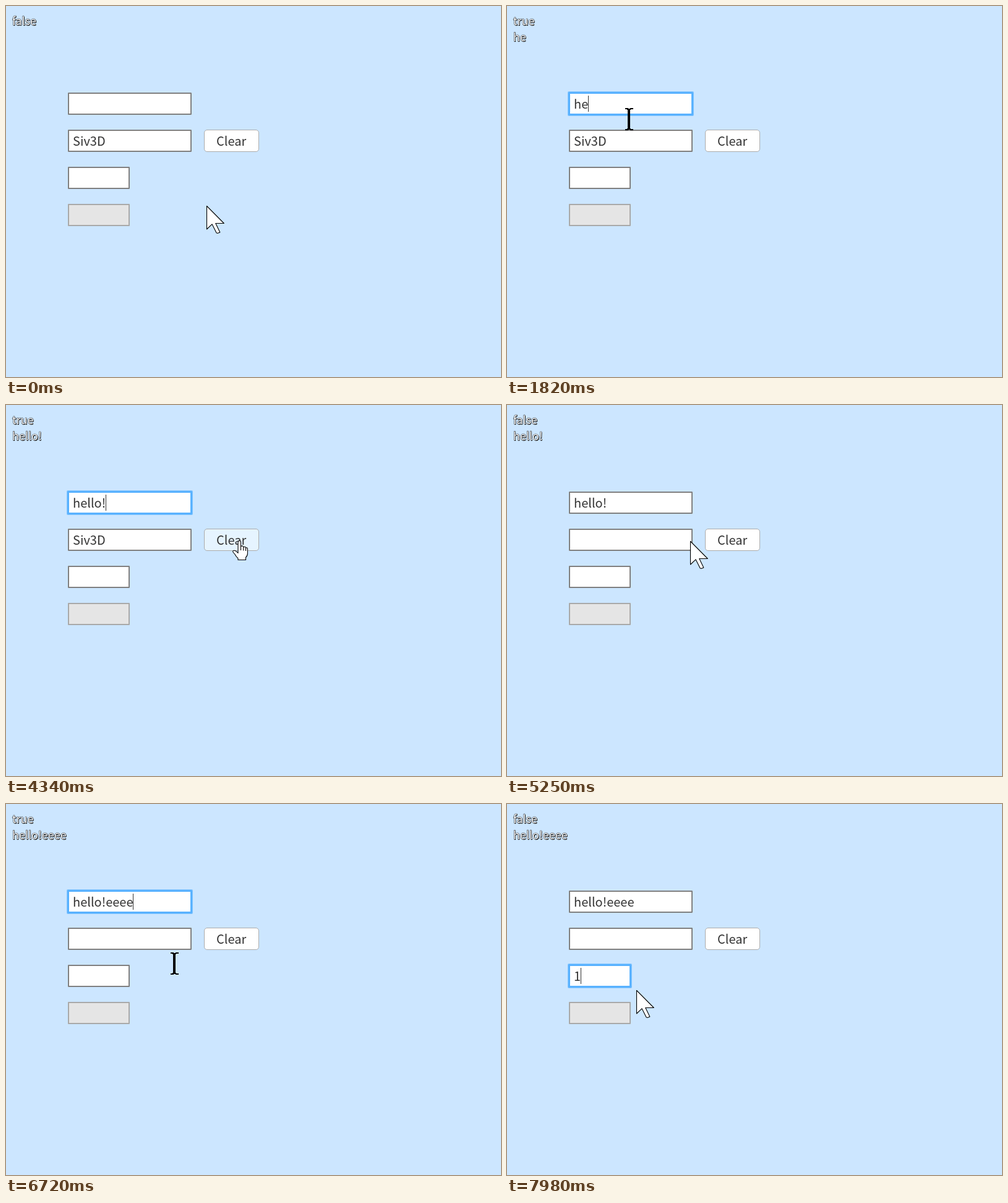
These frames come from a looping animation (800x600 px, 8000 ms). An HTML page with a canvas:

```html
<!DOCTYPE html>
<html lang="en">
<head>
<meta charset="utf-8">
<title>Text boxes</title>
<style>
  html, body { margin: 0; width: 100%; height: 100%; overflow: hidden; background: #cce6ff; }
  canvas { display: block; }
</style>
</head>
<body>
<canvas id="stage" width="800" height="600"></canvas>
<script>
const ctx = document.getElementById('stage').getContext('2d');
const LOOP = 8000, STEP = 70, BLINK = 630;
const INK = '#333';
const FAMILY = '"Noto Sans CJK JP", "Noto Sans CJK", "Noto Sans", sans-serif';

// Pointer path: time, x, y, shape
const pointer = [
  [0, 324, 323, 'arrow'], [140, 292, 296, 'arrow'], [280, 228, 238, 'arrow'],
  [420, 180, 198, 'beam'], [490, 178, 192, 'beam'], [630, 194, 185, 'beam'],
  [840, 194, 185, 'beam'], [910, 197, 183, 'beam'], [3430, 197, 183, 'beam'],
  [3500, 206, 244, 'arrow'], [3570, 240, 306, 'arrow'], [3640, 276, 358, 'arrow'],
  [3710, 296, 378, 'arrow'], [3920, 296, 378, 'arrow'], [4060, 322, 330, 'arrow'],
  [4200, 364, 234, 'hand'], [4340, 378, 219, 'hand'], [5040, 378, 219, 'hand'],
  [5180, 318, 222, 'arrow'], [5250, 296, 220, 'arrow'], [5390, 240, 204, 'arrow'],
  [5460, 218, 196, 'beam'], [5600, 200, 189, 'beam'], [6370, 200, 189, 'beam'],
  [6720, 272, 258, 'beam'], [6790, 262, 262, 'beam'], [6860, 238, 265, 'arrow'],
  [6930, 223, 267, 'arrow'], [7000, 200, 276, 'arrow'], [7070, 182, 298, 'beam'],
  [7140, 176, 304, 'beam'], [7490, 176, 304, 'beam'], [7560, 190, 303, 'arrow'],
  [7700, 209, 301, 'arrow'], [LOOP, 209, 301, 'arrow']
];

const typed = 'hello!eeee';
const keyTimes = [1610, 1820, 2240, 2380, 2590, 2870, 6160, 6300, 6440, 6580];
const FOCUS = 770, CLEAR = 4900, REFOCUS = 5740, NEXT = 7280, DIGIT = 7910;
const caretResets = [FOCUS, ...keyTimes, REFOCUS, NEXT, DIGIT];

function label(text, x, y) {
  ctx.font = `20px ${FAMILY}`;
  ctx.fillStyle = INK;
  ctx.fillText(text, x, y);
}

function frame(x, y, w, h, width, color) {
  ctx.lineWidth = width;
  ctx.strokeStyle = color;
  ctx.strokeRect(x, y, w, h);
}

function textBox(y, w, text, active, caretOn) {
  ctx.fillStyle = '#fff';
  ctx.fillRect(100, y, w, 36);
  if (active) {
    frame(100, y, w, 36, 4, 'rgba(89,178,255,.6)');
    frame(100.5, y + .5, w - 1, 35, 3, '#59b2ff');
  } else {
    frame(101, y + 1, w - 2, 34, 2, '#808080');
  }
  label(text, 108, y + 26);
  if (active && caretOn) {
    ctx.fillRect(Math.floor(108 + ctx.measureText(text).width), y + 5, 1, 26);
  }
}

function button(hover) {
  ctx.beginPath();
  ctx.roundRect(320.5, 200.5, 88, 35, 4.5);
  ctx.fillStyle = hover ? '#e6f4ff' : '#fff';
  ctx.fill();
  ctx.lineWidth = 1;
  ctx.strokeStyle = '#ababab';
  ctx.stroke();
  label('Clear', 340, 226);
}

function printLine(text, y) {
  ctx.font = `18px ${FAMILY}`;
  ctx.fillStyle = '#000';
  ctx.fillText(text, 10.8, y + .8);
  ctx.lineWidth = 1.2;
  ctx.lineJoin = 'round';
  ctx.strokeStyle = 'rgba(0,0,0,.75)';
  ctx.strokeText(text, 10, y);
  ctx.fillStyle = '#fff';
  ctx.fillText(text, 10, y);
}

const arrow = new Path2D('M.5.5V38L9 29.8L16.2 44L18 44.6L21.8 43L14.8 28.5H28.3Z');
const hand = new Path2D('M-3 17V3Q-3 .5-.8 .5Q1.5 .5 1.5 3V9.5Q5 7.8 5.7 10.7' +
  'Q8.8 9.2 9.5 12Q12.4 11 12.4 14V21Q12.4 25 9.5 27.5V31.5H-3V29' +
  'Q-6 26.5-8 22.5L-11 19Q-12 16.6-9.5 16.2Q-7 16-3 20.5Z');

function drawPointer(x, y, shape) {
  ctx.save();
  ctx.translate(Math.round(x), Math.round(y));
  if (shape === 'beam') {
    ctx.fillStyle = '#000';
    ctx.fillRect(-2, -16, 4, 32);
    for (const top of [-18, 16]) {
      ctx.fillRect(-6, top, 5, 2);
      ctx.fillRect(2, top, 5, 2);
    }
    ctx.fillRect(-3, -17, 6, 2);
    ctx.fillRect(-3, 15, 6, 2);
  } else {
    const path = shape === 'arrow' ? arrow : hand;
    ctx.fillStyle = '#fff';
    ctx.fill(path);
    ctx.lineWidth = 1.1;
    ctx.lineJoin = 'round';
    ctx.strokeStyle = '#000';
    ctx.stroke(path);
    if (shape === 'hand') {
      ctx.stroke(new Path2D('M1.5 9V16M5.7 10.7V16.5M9.5 12V17'));
    }
  }
  ctx.restore();
}

function pointerAt(t) {
  const i = pointer.findLastIndex(key => key[0] <= t);
  const [t0, x0, y0, shape] = pointer[i];
  const [t1, x1, y1] = pointer[i + 1];
  const k = (t - t0) / (t1 - t0);
  return [x0 + (x1 - x0) * k, y0 + (y1 - y0) * k, shape];
}

function draw(t) {
  const firstActive = t >= FOCUS && t < CLEAR || t >= REFOCUS && t < NEXT;
  const text = typed.slice(0, keyTimes.filter(k => k <= t).length);
  const lastReset = caretResets.filter(k => k <= t).reduce((a, b) => Math.max(a, b), 0);
  const caretOn = Math.floor((t - lastReset) / BLINK) % 2 === 0;
  const [x, y, shape] = pointerAt(t);

  ctx.fillStyle = '#cce6ff';
  ctx.fillRect(0, 0, 800, 600);
  textBox(140, 200, text, firstActive, caretOn);
  textBox(200, 200, t < CLEAR ? 'Siv3D' : '', false);
  textBox(260, 100, t < DIGIT ? '' : '1', t >= NEXT, caretOn);
  ctx.fillStyle = '#e5e5e5';
  ctx.fillRect(100, 320, 100, 36);
  frame(101, 321, 98, 34, 2, '#a9a9a9');
  button(shape === 'hand');
  printLine(String(firstActive), 31);
  printLine(text, 57);
  drawPointer(x, y, shape);
}

function tick() {
  const t = performance.now() % LOOP;
  draw(Math.floor(t / STEP) * STEP);
  requestAnimationFrame(tick);
}
tick();
</script>
</body>
</html>
```
